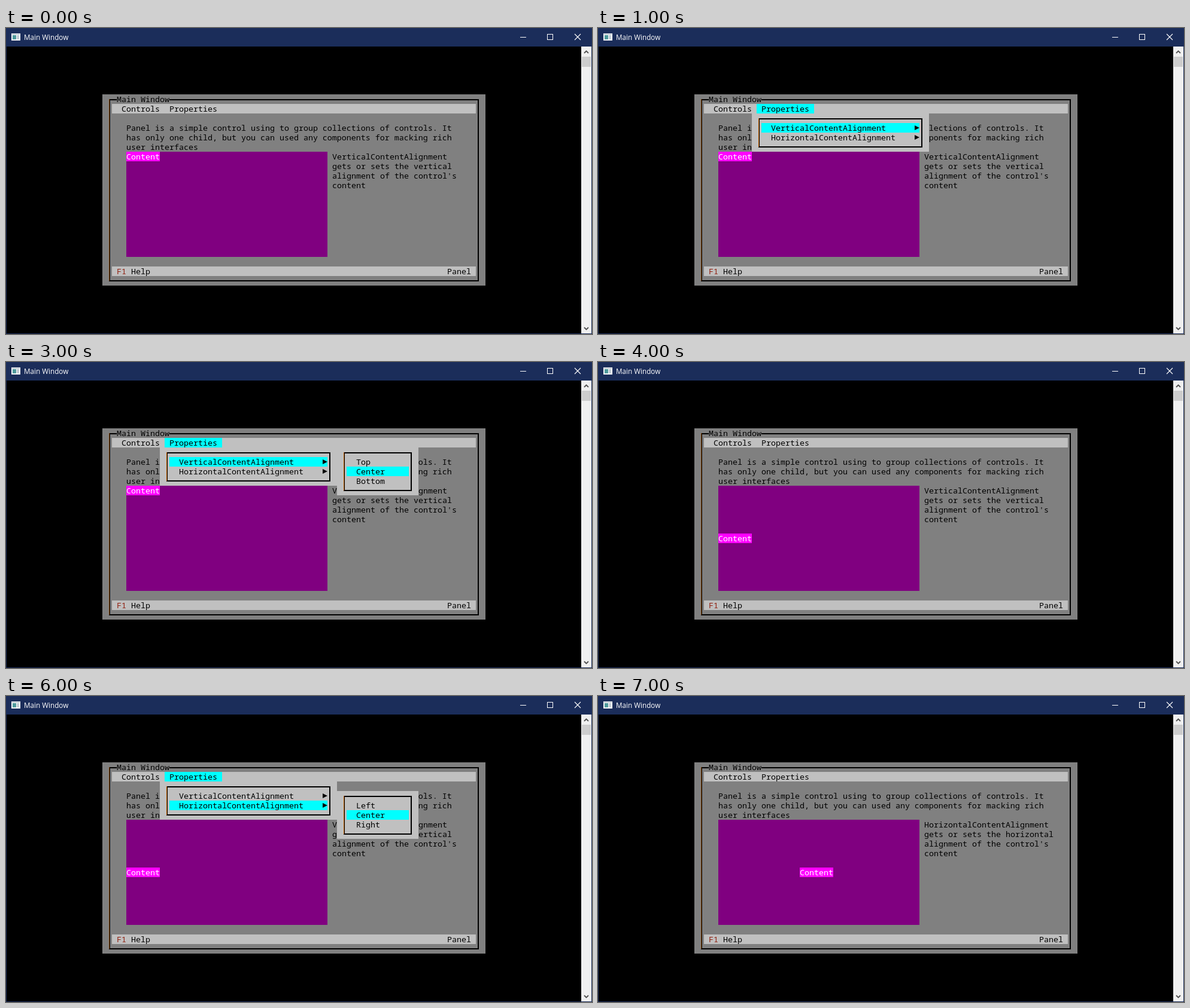
Write an HTML page with a canvas that moves like this. It is 979 by 512 pixels and loops after 8 s.

```html
<!DOCTYPE html>
<html lang="en">
<head>
<meta charset="utf-8">
<title>Main Window</title>
<style>
  html, body { margin: 0; width: 100%; height: 100%; overflow: hidden; background: #000; }
  canvas { display: block; }
</style>
</head>
<body>
<canvas id="stage" width="979" height="512"></canvas>
<script>
const ctx = document.getElementById('stage').getContext('2d');
const LOOP = 8000, STEP = 1000;
const CELL_W = 8, CELL_H = 16;
const MONO = '13.333px "Noto Sans Mono", monospace';
const NAVY = '#1b2d5a', GRAY = '#808080', SILVER = '#c0c0c0', CYAN = '#00ffff';

const INTRO = [
  'Panel is a simple control using to group collections of controls. It',
  'has only one child, but you can used any components for macking rich',
  'user interfaces'
];
const MENU = ['VerticalContentAlignment', 'HorizontalContentAlignment'];
const OPTIONS = [['Top', 'Center', 'Bottom'], ['Left', 'Center', 'Right']];

// One state per second: menu row, option row, content alignment, described property.
const STATES = [
  {},
  { menu: 0 },
  { menu: 0, option: 0 },
  { menu: 0, option: 1 },
  { middle: true },
  { middle: true, menu: 1 },
  { middle: true, menu: 1, option: 1 },
  { middle: true, center: true, about: 1 }
];

function rect(x, y, w, h, color) {
  ctx.fillStyle = color;
  ctx.fillRect(x, y, w, h);
}

function path(points, color, width) {
  ctx.beginPath();
  points.forEach(([x, y], i) => i ? ctx.lineTo(x, y) : ctx.moveTo(x, y));
  ctx.strokeStyle = color;
  ctx.lineWidth = width;
  ctx.stroke();
}

// Console text; y is the top of the character cell.
function text(str, x, y, color = '#000') {
  ctx.font = MONO;
  ctx.fillStyle = color;
  ctx.fillText(str, x, y + 13);
}

function lines(list, x, y) {
  list.forEach((line, i) => text(line, x, y + i * CELL_H));
}

// Box-drawing border around whole cells, with a warm fringe on the left.
function border(x, y, w, h, fringe) {
  const left = x + 3, right = x + w - 5, top = y + 8, bottom = y + h - 8;
  rect(left, top, right + 2 - left, 2, '#000');
  rect(left, bottom - 1, right + 2 - left, 2, '#000');
  rect(right, top, 2, bottom - top, '#000');
  rect(left + 1, top, 1, bottom - top, '#000');
  rect(left, top, 1, bottom - top, fringe);
}

function chevron(x, y, dir) {
  path([[x - 3.5, y + 2 * dir], [x, y - 1.5 * dir], [x + 3.5, y + 2 * dir]], '#505050', 1.8);
}

function drawFrame() {
  rect(0, 0, 979, 512, NAVY);
  rect(1, 31, 960, 480, '#000');

  rect(9, 9, 15, 12, '#f4f6f8');
  rect(10, 10, 13, 1, '#a9b4c0');
  rect(11, 12, 6, 7, '#4f9a9c');
  rect(18, 12, 4, 7, '#c3ccd4');

  ctx.font = '11.7px "Open Sans", sans-serif';
  ctx.fillStyle = '#fff';
  ctx.fillText('Main Window', 30, 20);

  rect(859, 15, 10, 1, '#fff');
  ctx.strokeStyle = '#fff';
  ctx.lineWidth = 1;
  ctx.strokeRect(904.5, 10.5, 9, 9);
  path([[950, 10], [960, 20]], '#fff', 1.1);
  path([[960, 10], [950, 20]], '#fff', 1.1);

  rect(961, 31, 17, 480, '#f0f0f0');
  rect(962, 48, 15, 17, '#cdcdcd');
  chevron(969.5, 40, 1);
  chevron(969.5, 503, -1);
}

function drawDialog({ middle, center, about = 0 }) {
  rect(161, 111, 640, 320, GRAY);
  border(169, 111, 624, 320, '#804000');
  rect(185, 111, 88, CELL_H, GRAY);
  text('Main Window', 185, 111);

  rect(177, 127, 608, CELL_H, SILVER);
  text('Controls', 193, 127);
  text('Properties', 273, 127);
  rect(177, 399, 608, CELL_H, SILVER);
  text('F1', 185, 399, '#902010');
  text('Help', 209, 399);
  text('Panel', 737, 399);

  lines(INTRO, 201, 159);
  lines([
    MENU[about],
    `gets or sets the ${about ? 'horizontal' : 'vertical'}`,
    "alignment of the control's",
    'content'
  ], 545, 207);

  rect(201, 207, 336, 176, '#800080');
  const x = 201 + (center ? 17 * CELL_W : 0);
  const y = 207 + (middle ? 5 * CELL_H : 0);
  rect(x, y, 7 * CELL_W, CELL_H, '#ff00ff');
  text('Content', x, y, '#fff');
}

function drawList(items, active, x, y, w) {
  const h = (items.length + 2) * CELL_H;
  rect(x, y, w, h, SILVER);
  border(x + 8, y, w - 16, h, '#c06000');
  rect(x + 16, y + (active + 1) * CELL_H, w - 32, CELL_H, CYAN);
  lines(items, x + 32, y + CELL_H);
}

function arrow(x, y) {
  ctx.fillStyle = '#000';
  ctx.beginPath();
  ctx.moveTo(x, y + 4);
  ctx.lineTo(x + 8, y + 8);
  ctx.lineTo(x, y + 12);
  ctx.fill();
}

function drawMenu({ menu, option }) {
  if (menu === undefined) return;
  rect(265, 127, 96, CELL_H, CYAN);
  text('Properties', 273, 127);
  drawList(MENU, menu, 257, 143, 296);
  arrow(529, 159);
  arrow(529, 175);
  if (option !== undefined) {
    drawList(OPTIONS[menu], option, 553, 143 + menu * CELL_H, 136);
  }
}

const start = performance.now();

function render() {
  const time = (performance.now() - start) % LOOP;
  const state = STATES[Math.floor(time / STEP)];
  drawFrame();
  drawDialog(state);
  drawMenu(state);
  requestAnimationFrame(render);
}

render();
</script>
</body>
</html>
```
